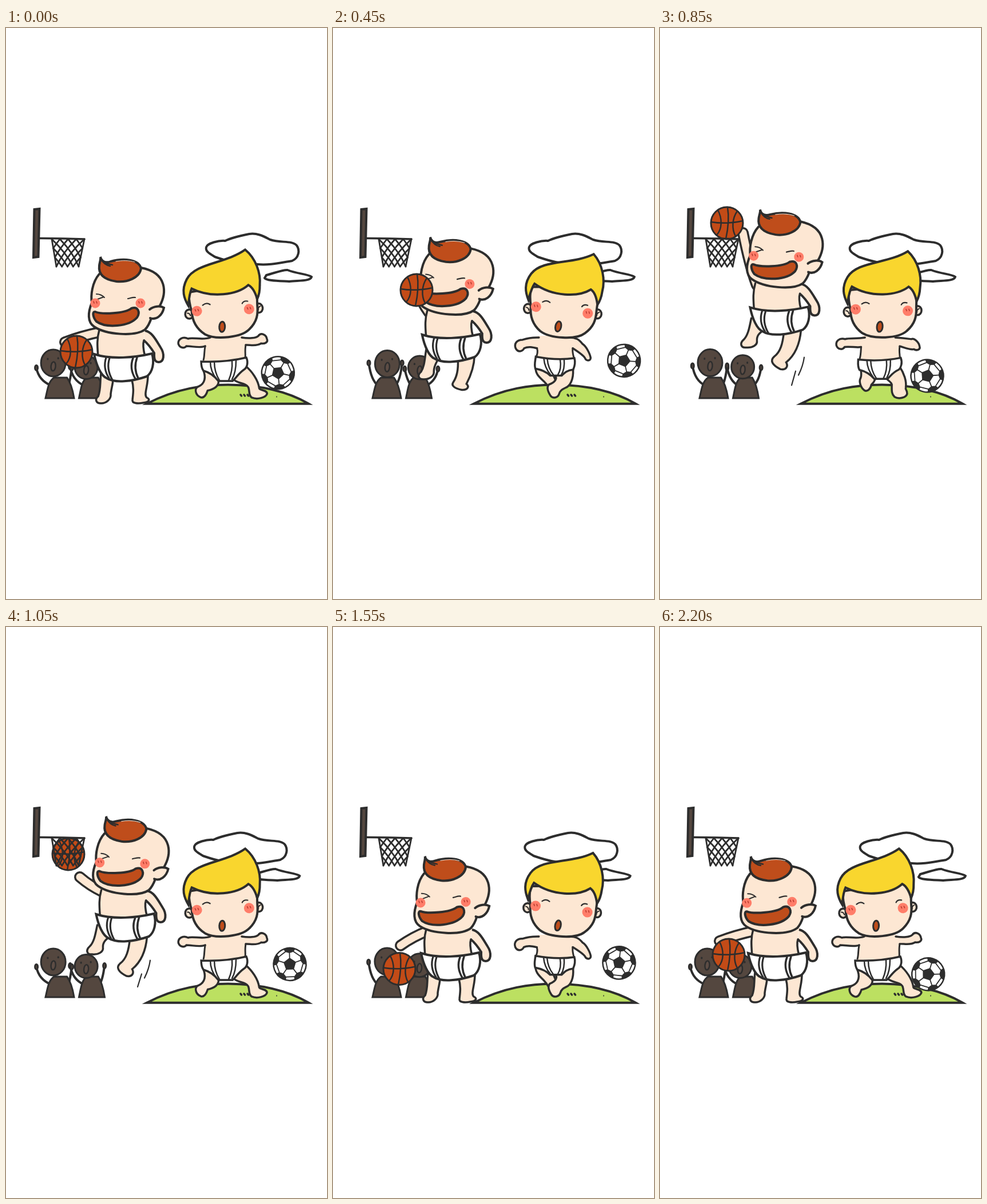
Animation, 561 px wide and 998 px high, one loop 2250 ms. Source, as an HTML page with a canvas:

```html
<!DOCTYPE html>
<html lang="en">
<head>
<meta charset="utf-8">
<title>Sporty babies</title>
<style>
  html, body { margin: 0; width: 100%; height: 100%; overflow: hidden; background: #fff; }
  canvas { display: block; width: 100vw; height: 100vh; }
</style>
</head>
<body>
<canvas id="stage"></canvas>
<script>
const W = 561, H = 998, LOOP = 2250, STEP = 50;
const INK = '#2d2d2d', SKIN = '#fde7d3', RED = '#bf4d1b', YELLOW = '#f9d62e',
      GREEN = '#bce061', BLUSH = '#ff7d69', DARK = '#54473f', WHITE = '#fff';

const canvas = document.getElementById('stage');
const ratio = window.devicePixelRatio || 1;
canvas.width = W * ratio;
canvas.height = H * ratio;
const c = canvas.getContext('2d');
c.lineCap = 'round';

// ---- helpers ----
const lerp = (a, b, k) => a + (b - a) * k;

// Value (or list of values) at time t; each key is [time, ...values].
function at(t, keys, smooth) {
  let i = 0;
  while (i < keys.length - 2 && t > keys[i + 1][0]) i++;
  const a = keys[i], b = keys[i + 1];
  let k = Math.min(1, Math.max(0, (t - a[0]) / (b[0] - a[0])));
  if (smooth) k = (1 - Math.cos(Math.PI * k)) / 2;
  const out = a.slice(1).map((v, n) => lerp(v, b[n + 1], k));
  return out.length > 1 ? out : out[0];
}

// Blend two paths that share the same commands.
function mix(a, b, k) {
  const nums = b.match(/-?[\d.]+/g);
  let i = 0;
  return a.replace(/-?[\d.]+/g, n => lerp(+n, +nums[i++], k).toFixed(2));
}

function paint(path, fill, width = 3.5, ink = INK) {
  if (typeof path === 'string') path = new Path2D(path);
  if (fill) { c.fillStyle = fill; c.fill(path); }
  if (width) { c.lineWidth = width; c.strokeStyle = ink; c.stroke(path); }
}

function oval(x, y, rx, ry, fill, width = 0, turn = 0) {
  const p = new Path2D();
  p.ellipse(x, y, rx, ry, turn, 0, Math.PI * 2);
  paint(p, fill, width);
}

function group(x, y, turn, draw) {
  c.save();
  c.translate(x, y);
  c.rotate(turn * Math.PI / 180);
  draw();
  c.restore();
}

function cheek(x, y, r) {
  oval(x, y, r, r, BLUSH);
  paint(`M${x - 3},${y - 3}l1,3M${x + 2},${y - 3}l1,3`, null, 1.5, '#b5372b');
}

// ---- scenery ----
const BIG_CLOUD = 'M350,383C352,376 372,371 383,372C395,366 415,362 425,360C440,358 450,364 462,370' +
  'C480,376 500,371 508,380C514,388 512,402 500,407C480,410 460,415 440,413C400,413 380,405 365,400C355,394 348,390 350,383Z';
const SMALL_CLOUD = 'M455,432C470,428 485,422 492,423C510,430 528,430 534,435C532,443 510,441 495,443C475,442 455,442 452,437Z';

function clouds(t) {
  const drift = -10.5 * (1 - Math.cos(2 * Math.PI * t / LOOP));
  group(drift, 0, 0, () => {
    paint(BIG_CLOUD, WHITE, 4);
    paint(SMALL_CLOUD, WHITE, 4);
  });
}

function hill() {
  paint('M246,656.7C300,629 345,624 388,623.5C440,624 490,634 529,656.7Z', GREEN, 4);
  for (const x of [410, 416, 422]) paint(`M${x},641l1.5,2`, null, 3.5);
  paint('M473,644v1', null, 1.5);
}

function board() {
  paint('M49.5,317L58.5,316L56.5,400L48,401Z', DARK, 4);
}

function net(t) {
  const drop = at(t, [[1100, 1], [1200, 0.85], [1250, 0.6], [1300, 0.62], [1450, 1.06], [1550, 1]]);
  const curl = Math.max(0, 1 - drop) * 2.5;
  const point = (u, v) => {
    const x = lerp(80 + 57 * u, 88 + 39 * u, v);
    return [lerp(x, 108 + (x - 108) * 0.7, curl * v), 369 + 48 * v * drop - curl * v * 10 * (2 * u - 1) ** 2];
  };
  const line = (u0, v0, u1, v1) => {
    const p = new Path2D();
    for (let i = 0; i <= 4; i++) p.lineTo(...point(lerp(u0, u1, i / 4), lerp(v0, v1, i / 4)));
    paint(p, null, 2.8);
  };
  paint('M58,367.5L100,368L137,369', null, 3.5);
  line(0, 0, 0, 1);
  line(1, 0, 1, 1);
  const run = 0.75;
  for (let k = -2; k <= 3; k++) {
    const u = k / 4;
    const v0 = Math.max(0, -u / run), v1 = Math.min(1, (1 - u) / run);
    line(u + run * v0, v0, u + run * v1, v1);
    line(1 - u - run * v0, v0, 1 - u - run * v1, v1);
  }
}

function sparkles(t) {
  c.globalAlpha = at(t, t < 300 ? [[150, 0], [250, 1]] : [[350, 1], [450, 0]]);
  for (const [x, y, r] of [[283, 341, 10], [107, 441, 14], [82, 494, 15]]) {
    const q = r * 0.3;
    group(x, y, 8, () => paint(
      `M0,${-r}Q${q},${-q} ${r * 0.7},0Q${q},${q} 0,${r}Q${-q},${q} ${-r * 0.7},0Q${-q},${-q} 0,${-r}Z`,
      WHITE, 1.5, '#e2e2e2'));
  }
  c.globalAlpha = 1;
}

// ---- crowd ----
function fan(x, w, headX, headY, rx, ry, leftX, rightX, handY) {
  const hand = (from, to, bend) => {
    paint(`M${from},625Q${bend},616 ${to},${handY}`, null, 4);
    oval(to, handY, 2.5, 4.5, DARK, 3);
  };
  hand(x - w * 0.3, leftX, leftX + 4);
  hand(x + w * 0.3, rightX, rightX - 3);
  paint(`M${x - w / 2},647C${x - w * 0.42},630 ${x - w * 0.4},618 ${x - w * 0.2},611` +
        `L${x + w * 0.25},611C${x + w * 0.38},620 ${x + w * 0.46},635 ${x + w / 2},647Z`, DARK, 3);
  oval(headX, headY, rx, ry, DARK, 3);
  oval(headX - rx * 0.45, headY - ry * 0.3, 1.6, 2, INK);
  oval(headX + rx * 0.4, headY - ry * 0.35, 1.6, 2, INK);
  oval(headX, headY + ry * 0.25, 4, 8, '#5d4d45', 2.5, 0.1);
}

function crowd(t, s) {
  const dip = at(t, t < 300 ? [[50, 0], [300, 6]] : [[300, 6], [550, 0]]);
  fan(150, 45, 140 + 12 * s, 593 + dip - 2 * s, 20, 20.5, 112 + 14 * s, 172 + 12 * s, 592 + 4 * s);
  fan(94, 50, 82.5 + 13 * s, 585.5 + dip - s, 21.5, 23.5, 53 + 10 * s, 115 + 6 * s, 594 - 9 * s);
}

// ---- basketball boy ----
const DUNK_LEG_L = ['M166,604C164,620 166,632 161,644C155,649 157,656 166,656C176,656 184,648 183,640C184,630 187,622 187,614',
                    'M156,589C153,603 151,618 143,626C135,633 138,641 147,640C158,641 167,636 166,628C165,618 173,613 178,609'];
const DUNK_LEG_R = ['M220,615C224,630 222,640 221,650C220,656 230,657 240,655C250,654 253,649 246,646C240,640 249,625 248,604',
                    'M213,613C211,633 207,648 196,656C188,663 193,671 207,678C217,680 221,673 217,666C233,653 241,633 243,609'];

function dunkHead() {
  paint('M163,430C150,445 148,468 150,480C143,497 142,514 154,522C175,536 225,540 243,527C249,521 252,513 254,507' +
        'L268,487C281,464 283,428 244,420C225,416 190,420 163,430Z', SKIN, 0);
  paint('M163,430C150,445 148,468 150,480C143,497 142,514 154,522C175,536 225,540 243,527C249,521 252,513 254,507' +
        'M268,487C281,464 283,428 236,419', null, 4);
  paint('M251,492C258,486 270,485 276,489C273,503 262,511 252,507', SKIN, 4);
  paint('M165,400C167,409 175,411 183,408C205,402 232,404 236,420C234,437 211,445 193,443C172,440 161,431 163,415C164,408 166,404 165,400Z', RED, 4);
  paint('M167,405C171,413 176,415 182,416M174,411L186,414', null, 2.5);
  paint('M192,408C203,406 215,406 225,409', null, 1, '#f3d8c5');
  paint('M158,465C164,465 169,468 172,471M160,474L171,470', null, 2);
  paint('M213,473C218,472 222,470 226,471', null, 2.2);
  cheek(156, 481, 8.5);
  cheek(235, 481, 8.5);
  paint('M156,496C168,501 208,499 219,490C231,486 235,497 229,506C215,522 175,525 158,513C152,506 150,495 156,496Z', RED, 4);
}

function dunkBoy(t) {
  const lift = at(t, [[350, 0], [400, -14], [550, -74], [650, -83], [800, -85], [1050, -68], [1200, 0]]);
  const jump = at(t, t < 700 ? [[350, 0], [550, 1]] : [[1100, 1], [1200, 0]]);
  const sway = at(t, [[1300, 0], [1850, -4.5], [2200, -3], [LOOP, -1]]);
  const [hx, hy] = at(t, [[0, 103, 549], [300, 146, 574], [400, 146, 500], [550, 146, 372], [650, 152, 352], [850, 145, 358],
    [1050, 129, 437], [1200, 140, 555], [1300, 142, 568], [1400, 112, 547], [1600, 120, 560], [1700, 114, 550],
    [1850, 126, 563], [1950, 126, 565], [2200, 104, 549], [LOOP, 103, 549]]);

  if (jump === 1) {
    const y = lift + 83;
    paint(`M252,${575 + y / 2}Q250,${590 + y / 2} 242,${606 + y / 2}M237,${599 + y / 2}L230,${624 + y / 3}`, null, 2.2);
  }

  const sx = 166 + 3 * jump, sy = 531 + lift;
  const arm = new Path2D(`M${sx},${sy}Q${lerp(sx, hx, 0.55)},${lerp(sy, hy, 0.4)} ${hx},${hy}`);
  paint(arm, null, 20, INK);
  paint(arm, null, 13, SKIN);

  group(3.5 * jump, lift, 0, () => {
    paint(mix(...DUNK_LEG_L, jump), SKIN);
    paint(mix(...DUNK_LEG_R, jump), SKIN);
    paint('M243,529C255,531 262,545 270,558C278,570 276,584 267,584C258,584 259,574 259,568C254,560 248,552 241,546', SKIN, 4);
    paint('M164,524C158,540 159,560 161,578L242,576C239,562 240,542 244,524Z', SKIN, 0);
    paint('M163,528C158,545 160,560 161,576M241,546C238,555 241,566 243,574', null, 3.5);
    paint('M154,570C185,580 225,576 255,569C260,585 256,602 246,609C220,618 190,621 176,612C166,608 158,590 154,570Z', WHITE, 4);
    paint('M175,576C171,588 173,601 180,612M181,577C177,589 179,603 186,615', null, 3.2);
    paint('M222,577C217,590 220,603 226,613M229,576C224,590 226,602 231,612', null, 3.5);
  });
  group(sway + 6.5 * jump + 205, lift + 530, 1.5 * jump + sway * 0.5, () => {
    c.translate(-205, -530);
    dunkHead();
  });
}

function basketball(t) {
  const [x, y] = at(t, [[0, 123, 566], [150, 142, 572], [300, 161, 585], [400, 156, 520], [500, 136, 396], [550, 127, 352],
    [650, 122, 339], [850, 117, 341], [1050, 109, 397], [1100, 109, 440], [1200, 110, 633], [1300, 112, 585], [1400, 115, 563],
    [1500, 117, 570], [1600, 115, 625], [1700, 114, 574], [1850, 114, 590], [1950, 114, 624], [2050, 116, 592],
    [2200, 120, 573], [LOOP, 123, 566]]);
  group(x, y, 0, () => {
    oval(0, 0, 28, 28, '#c34b17', 3);
    paint('M1,-28C4,-10 2,10 -2,28M-28,-2C-10,1 10,0 28,-4', null, 2.5);
    paint('M-16,-23C-8,-8 -8,10 -18,21M18,-21C9,-8 8,10 15,23', null, 2.5);
  });
}

// ---- football boy ----
const KICK = {
  legL: ['M344,597C350,610 348,622 336,627C328,630 330,642 340,646C347,648 350,640 352,634C362,632 374,627 371,613',
         'M355,595C353,606 362,612 372,621C380,628 382,634 384,642C388,648 398,642 397,636C396,625 388,616 384,603'],
  legR: ['M396,613C404,622 420,620 424,628C427,636 424,642 430,646C440,650 455,646 457,639C456,632 445,634 443,630C441,615 430,600 418,590',
         'M385,603C395,612 385,620 375,623C370,628 373,635 378,643C382,648 390,646 392,640C394,632 402,630 408,627C416,622 421,608 419,593'],
  armL: ['M357,541C345,546 325,540 318,543C308,538 300,545 301,552C304,560 312,560 315,556C325,556 340,560 348,556',
         'M360,541C345,540 338,543 332,545C322,545 317,552 320,560C324,568 332,566 335,560C342,556 350,558 357,560'],
  armR: ['M412,541C425,543 437,542 441,538C446,531 455,536 456,543C459,549 452,552 446,551C437,557 425,553 419,554',
         'M410,541C425,540 430,545 436,553C443,558 449,572 450,578C450,584 442,584 440,578C438,573 428,566 419,560'],
  torso: ['M352,538C346,555 347,570 345,582L418,580C418,565 421,550 414,538Z',
          'M358,538C356,555 360,565 354,579L420,579C418,565 422,552 414,538Z'],
  sides: ['M348,556C346,566 347,574 345,580M419,554C417,564 419,572 418,576',
          'M357,560C359,566 357,572 355,576M419,560C418,566 420,572 421,576'],
  nappy: ['M341,583C365,584 395,582 420,576C424,585 421,594 416,597C406,604 402,612 396,617L371,617C364,608 356,602 345,599C341,594 341,588 341,583Z',
          'M355,574C375,578 400,580 422,577C424,585 422,592 420,597C408,598 404,603 400,607L380,607C373,600 365,597 354,595C352,588 354,582 355,574Z'],
  bands: ['M357,584C357,596 362,606 368,614M364,584C364,596 368,608 373,616M395,582C396,595 393,607 389,616M402,581C402,595 399,607 395,614',
          'M369,577C370,590 376,600 381,606M375,578C376,590 381,600 386,606M397,579C399,590 397,600 393,606M404,579C405,590 403,600 399,606']
};

function kickHead() {
  c.translate(-397.5, -492);
  oval(338, 493, 7, 8, SKIN, 3.5);
  oval(460, 495, 7, 8, SKIN, 3.5);
  paint('M335,491Q339,491 340,496M463,492Q459,493 459,498', null, 2);
  paint('M341,455C340,468 341,480 343,488C342,505 348,520 362,531C380,543 425,543 440,530C455,518 458,505 458,490C460,475 458,460 452,448Z', SKIN, 4);
  paint('M338,478C332,465 328,450 340,432C358,405 410,412 447,391C464,408 470,435 466,455C465,467 462,474 459,479' +
        'C457,468 454,458 446,453C425,468 380,470 347,449C342,457 340,468 338,478Z', YELLOW, 4);
  paint('M363,480Q370,475 376,480M432,484Q435,479 442,481', null, 2.2);
  cheek(352, 489, 9);
  cheek(443, 495, 9);
  oval(393, 521, 5, 9, RED, 3, 0.15);
}

function kickBoy(s) {
  const part = (name, fill, width) => paint(mix(...KICK[name], s), fill, width);
  group(0, -12 * Math.sin(Math.PI * s), 0, () => part('legL', SKIN));
  part('legR', SKIN);
  part('torso', SKIN, 0);
  part('armL', SKIN);
  part('armR', SKIN);
  part('sides', null, 3);
  part('nappy', WHITE);
  part('bands', null, 2.5);
  group(379 + 22 * s, 493, -6 + 10 * s, kickHead);
}

function football(t) {
  const x = at(t, [[-90, 467], [275, 525], [760, 468], [850, 467], [1250, 525], [1900, 468], [2160, 467], [2525, 525]], true);
  const R = 28.5;
  const dot = (r, a) => [r * Math.sin(a), -r * Math.cos(a)];
  group(x, 608 - (x - 467) * 0.64, (x - 467) * 1.94 + 14, () => {
    oval(0, 0, R, R, WHITE);
    c.save();
    c.clip(new Path2D(`M${R},0A${R},${R} 0 1 1 ${-R},0A${R},${R} 0 1 1 ${R},0Z`));
    const core = new Path2D();
    for (let i = 0; i < 5; i++) {
      const a = i * Math.PI * 0.4, b = a + Math.PI * 0.2;
      core.lineTo(...dot(11.5, a));
      const patch = new Path2D();
      for (const [r, d] of [[19.5, 0], [23, -0.33], [32, -0.38], [32, 0.38], [23, 0.33]]) patch.lineTo(...dot(r, a + d));
      patch.closePath();
      paint(patch, INK, 0);
      const seam = new Path2D();
      seam.moveTo(...dot(11, a));
      seam.lineTo(...dot(19.5, a));
      seam.moveTo(...dot(23, a + 0.33));
      seam.lineTo(...dot(22, b));
      seam.lineTo(...dot(23, a + Math.PI * 0.4 - 0.33));
      paint(seam, null, 1.8);
    }
    core.closePath();
    paint(core, INK, 0);
    c.restore();
    oval(0, 0, R, R, null, 2.5);
  });
}

// ---- timeline ----
function draw(t) {
  const stride = (1 - Math.cos(4 * Math.PI * (t + 35) / LOOP)) / 2;
  c.setTransform(ratio, 0, 0, ratio, 0, 0);
  c.fillStyle = WHITE;
  c.fillRect(0, 0, W, H);
  clouds(t);
  hill();
  football(t);
  kickBoy(stride);
  board();
  sparkles(t);
  crowd(t, stride);
  dunkBoy(t);
  basketball(t);
  net(t);
}

const start = performance.now();
function tick() {
  const t = (performance.now() - start) % LOOP;
  draw(Math.floor(t / STEP) * STEP);
  requestAnimationFrame(tick);
}
tick();
</script>
</body>
</html>
```
